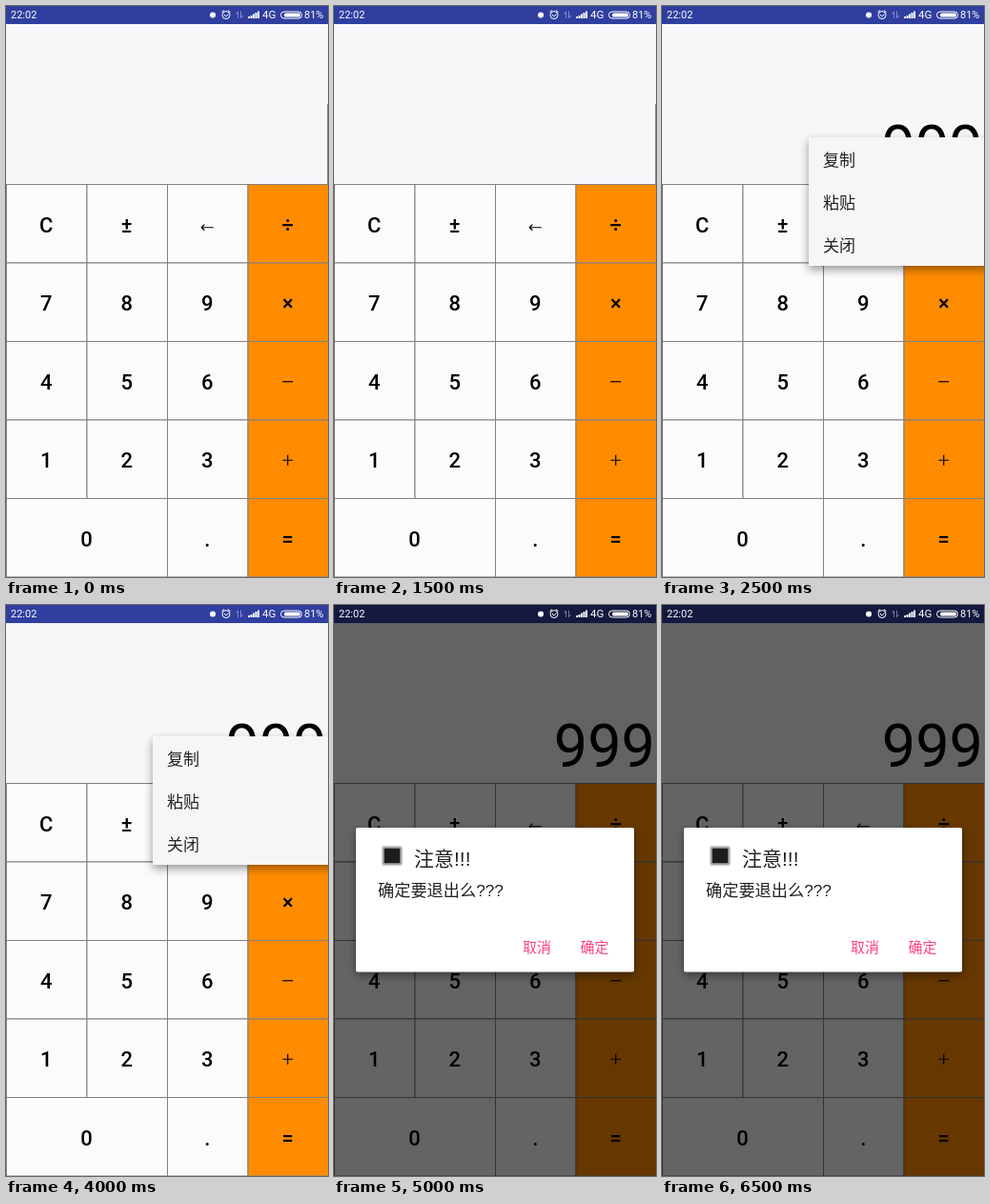
An HTML page for the animation above (7500 ms loop, 338 by 600 pixels).

```html
<!DOCTYPE html>
<html lang="zh-CN">
<head>
<meta charset="utf-8">
<style>
html, body { margin: 0; width: 100%; height: 100%; overflow: hidden; background: #f9f6fa; }
svg { display: block; width: 338px; height: 600px; }
text { font-family: Roboto, sans-serif; }
.key { font-size: 22px; font-weight: 500; text-anchor: middle; }
.cjk { font-family: "Liberation Sans", "Noto Sans CJK SC", "Noto Sans CJK", sans-serif; font-weight: 300; fill: #222; }
.pink { fill: #ff4081; font-size: 15px; }
</style>
</head>
<body>
<svg viewBox="0 0 338 600">
  <defs>
    <filter id="shadow" x="-20%" y="-20%" width="140%" height="150%">
      <feDropShadow dx="0" dy="4" stdDeviation="5" flood-opacity=".4"/>
    </filter>
    <filter id="soft"><feGaussianBlur stdDeviation="1.2"/></filter>
  </defs>
  <rect width="338" height="600" fill="#f9f6fa"/>
  <rect width="338" height="19" fill="#303f9f"/>
  <g id="keys"></g>
  <path data-show="0" d="M337.5 103V187" stroke="#909090"/>
  <text data-show="1 2" x="337" y="170" font-size="63" text-anchor="end">999</text>

  <g data-show="1" class="cjk" font-size="17">
    <rect x="154" y="138" width="190" height="135" fill="#f8f5f9" filter="url(#shadow)"/>
    <text class="cjk" x="169" y="168">复制</text>
    <text class="cjk" x="169" y="213">粘贴</text>
    <text class="cjk" x="169" y="258">关闭</text>
  </g>

  <g data-show="2">
    <rect width="338" height="600" opacity=".6"/>
    <rect x="23" y="234" width="292" height="151.5" rx="2" fill="#fff" filter="url(#shadow)"/>
    <rect x="51" y="254" width="20" height="19" fill="#777" filter="url(#soft)"/>
    <rect x="53" y="256" width="16" height="15" fill="#1c1c1c"/>
    <text class="cjk" x="84" y="273.5" font-size="21">注意!!!</text>
    <text class="cjk" x="46" y="306" font-size="17.2">确定要退出么???</text>
    <text class="cjk pink" x="198" y="365">取消</text>
    <text class="cjk pink" x="258.5" y="365">确定</text>
  </g>

  <g fill="#fff" font-size="11">
    <text x="5" y="13">22:02</text>
    <text x="269" y="13.2" font-size="11.5">4G</text>
    <text x="313" y="13">81%</text>
    <circle cx="217" cy="9.5" r="3"/>
    <g fill="none" stroke="#fff">
      <circle cx="231" cy="9.5" r="4"/>
      <path d="M229 9L231 11L233.5 8.5M226.5 6.5L229 4.5M235.5 6.5L233 4.5"/>
      <path d="M243.5 13V6L241.5 8.5M246.5 5.5V12.5L248.5 10" opacity=".4"/>
      <rect x="288.5" y="6" width="22" height="7" rx="3.5"/>
    </g>
    <path d="M254 11h2v2h-2zM256.5 10h2v3h-2zM259 8.5h2v4.5h-2zM261.5 7h2v6h-2zM264 5.5h2v7.5h-2z"/>
    <rect x="292" y="7.5" width="17" height="4" rx="1.5"/>
  </g>
</svg>
<script>
const W = 84.5, H = 82.5, TOP = 187.5;
const rows = ["C±←÷", "789×", "456−", "123+", "0 .="];
// Thin symbols drawn as strokes around the key centre
const strokes = {
  "←": "M6.5 3H-6M-3 0L-6 3L-3 6",
  "−": "M-5.5 0H5.5",
  "+": "M-5.5 0H5.5M0-5.5V5.5",
};

let html = "";
rows.forEach((row, r) => [...row].forEach((label, c) => {
  if (label === " ") return;
  const w = label === "0" ? 2 * W : W, x = c * W, y = TOP + r * H;
  const cx = x + w / 2, cy = y + H / 2 + 1;
  html += `<rect x="${x + .5}" y="${y}" width="${w}" height="${H}" fill="${c === 3 ? "#ff8c00" : "#fcfafd"}" stroke="#808080"/>`;
  html += strokes[label]
    ? `<path d="${strokes[label]}" transform="translate(${cx} ${cy})" fill="none" stroke="#000" stroke-width="1.2"/>`
    : `<text class="key" x="${cx}" y="${cy + 8}">${label}</text>`;
}));
document.getElementById("keys").innerHTML = html;

const layers = document.querySelectorAll("[data-show]");
const start = performance.now();
function draw() {
  const step = String(Math.floor((performance.now() - start) / 2500) % 3);
  for (const layer of layers)
    layer.style.display = layer.dataset.show.includes(step) ? "" : "none";
  requestAnimationFrame(draw);
}
draw();
</script>
</body>
</html>
```
